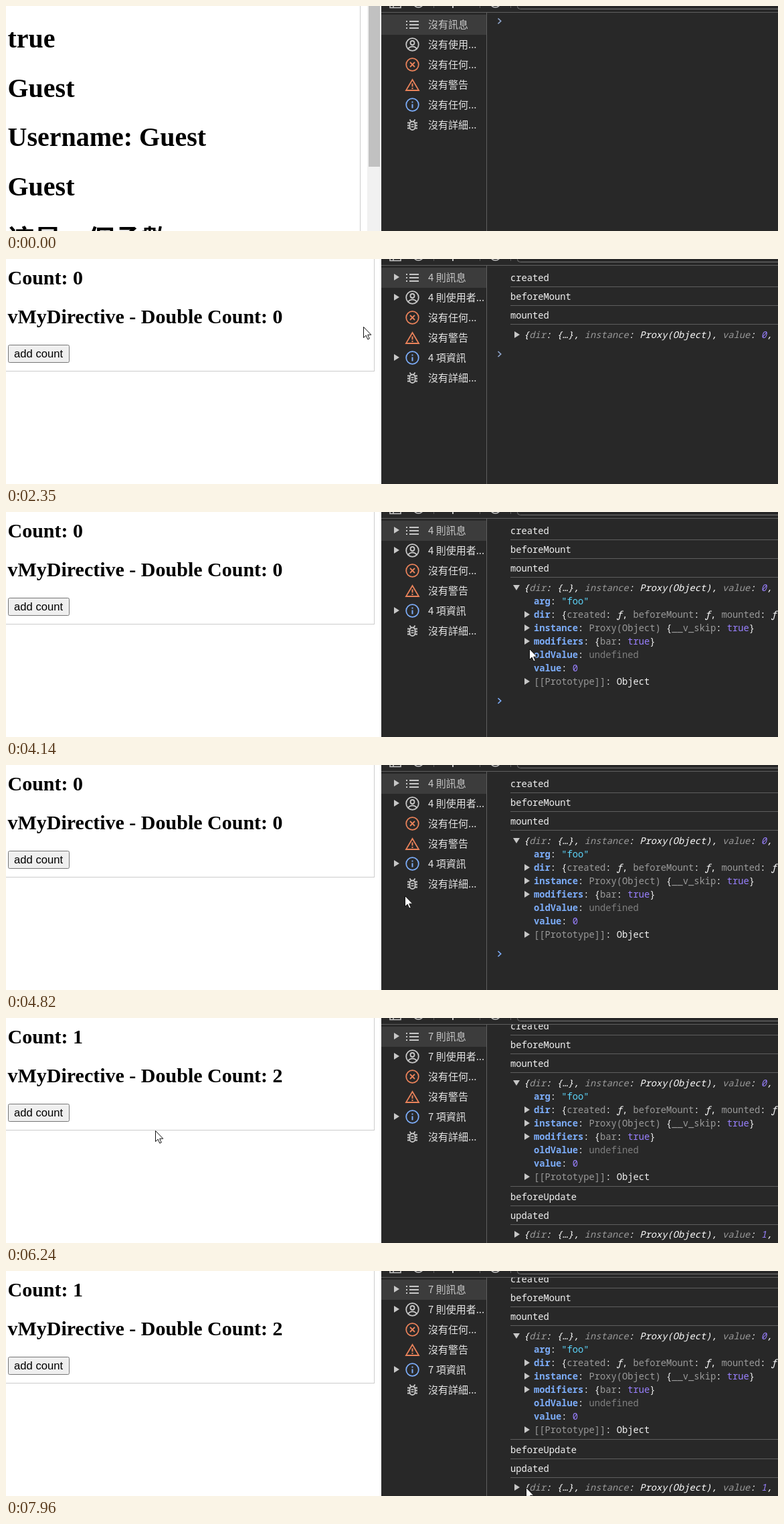
An HTML page with a canvas that plays this animation: 1154 by 336 pixels, repeating every 8 s.

```html
<!DOCTYPE html>
<html lang="zh-Hant">
<head>
<meta charset="utf-8">
<title>Directive hooks</title>
<style>
html, body { margin: 0; width: 100%; height: 100%; overflow: hidden; background: #fff; }
canvas { display: block; }
</style>
</head>
<body>
<canvas id="stage" width="1154" height="336"></canvas>
<script>
const canvas = document.getElementById('stage');
const ctx = canvas.getContext('2d');
const { width: W, height: H } = canvas;
const LOOP = 8000;
const SPLIT = 561, SIDE = 718, BAR = 10;
const LOG_X = 754, LOG_ROW = 28, TREE_ROW = 20, SIDE_ROW = 30;
const SERIF = '"Liberation Serif", serif';
const SANS = '"Liberation Sans", sans-serif';
const MONO = '"Noto Sans Mono", "DejaVu Sans Mono", monospace';
const CJK = '"Noto Sans CJK TC", "Noto Sans CJK", sans-serif';
const CODE_SIZE = 13.75, CELL = CODE_SIZE * 0.6;
const PANEL = '#282828', GREY = '#c7c7c7', LINE = '#5e5e5e';
const BLUE = '#7cacf8', DIM_BLUE = '#8fa5cc', ORANGE = '#e9825a';

// When the page and the console change.
const AT = { page: 1280, mount: 1350, expand: 3330, press: 5710, update: 5770 };

const linear = u => u;
const smooth = u => u * u * (3 - 2 * u);
const easeOut = power => u => 1 - (1 - u) ** power;

// Each cursor move starts where the last one ended, unless it has its own start.
const MOVES = [
  { start: 200, end: 550, steps: 6, from: [1142, -26], to: [344, 346], ease: linear },
  { start: 2140, end: 2760, steps: 9, from: [342, 198], to: [764, 115], ease: easeOut(1.5), bow: [0, -60] },
  { start: 3670, end: 4410, steps: 12, to: [819, 239], ease: linear, bow: [-22, 7] },
  { start: 4480, end: 5220, steps: 11, to: [303, 138], ease: smooth },
  { start: 5290, end: 5570, steps: 5, to: [68, 145], ease: easeOut(3) },
  { start: 6240, end: 6670, steps: 7, to: [819, 231], ease: easeOut(1.5), bow: [0, 8] },
  { start: 7060, end: 7830, steps: 12, to: [742, 315], ease: linear, bow: [62, -80] },
  { start: 7960, end: 7960, steps: 1, to: [777, 323], ease: linear }
];
MOVES.forEach((move, i) => move.from ??= MOVES[i - 1].to);

// Segments are split by "|"; the first letter picks the style.
const STYLES = {
  w: ['#f2f2f2', ''], g: ['#9a9a9a', ''], k: [BLUE, 'bold'], s: ['#5cd5fb', ''],
  n: ['#9980ff', ''], u: ['#7f7f7f', ''], i: ['#fff', 'italic'],
  d: ['#9a9a9a', 'italic'], m: ['#9980ff', 'italic']
};
const preview = value =>
  `i{|ddir|i: {…}, |dinstance|i: Proxy(Object), |dvalue|i: |m${value}|i,`;
const DETAILS = [
  'karg|w: |s"foo"',
  '>kdir|w: {|gcreated|w: |iƒ|w, |gbeforeMount|w: |iƒ|w, |gmounted|w: |iƒ|w,',
  '>kinstance|w: |gProxy(Object) |w{|g__v_skip|w: |ntrue|w}',
  '>kmodifiers|w: {|gbar|w: |ntrue|w}',
  'koldValue|w: |uundefined',
  'kvalue|w: |n0',
  '>g[[Prototype]]|w: Object'
];

function text(str, x, y, font, color) {
  ctx.font = font;
  ctx.fillStyle = color;
  ctx.fillText(str, x, y);
}

function rect(x, y, w, h, color) {
  ctx.fillStyle = color;
  ctx.fillRect(x, y, w, h);
}

function stroke(color, width, draw) {
  ctx.strokeStyle = color;
  ctx.lineWidth = width;
  ctx.beginPath();
  draw();
  ctx.stroke();
}

function poly(points, close) {
  points.forEach(([x, y], i) => i ? ctx.lineTo(x, y) : ctx.moveTo(x, y));
  if (close) ctx.closePath();
}

function segment(x1, y1, x2, y2) {
  poly([[x1, y1], [x2, y2]]);
}

function circle(x, y, r) {
  ctx.moveTo(x + r, y);
  ctx.arc(x, y, r, 0, Math.PI * 2);
}

function expander(x, y, open) {
  ctx.save();
  ctx.translate(x, y);
  if (open) ctx.rotate(Math.PI / 2);
  ctx.fillStyle = GREY;
  ctx.beginPath();
  poly([[-4, -5], [4, 0], [-4, 5]], true);
  ctx.fill();
  ctx.restore();
}

function cursorAt(t) {
  const move = MOVES.findLast(m => t >= m.start);
  if (!move) return MOVES[0].from;
  const { start, end, steps, from, to, ease, bow = [0, 0] } = move;
  const gap = (end - start) / (steps - 1) || 1;
  const step = Math.min(steps, Math.floor((t - start + 1) / gap) + 1);
  const u = ease(step / steps);
  const swing = Math.sin(Math.PI * u);
  return from.map((v, axis) => Math.round(v + (to[axis] - v) * u + bow[axis] * swing));
}

function drawCursor([x, y]) {
  ctx.save();
  ctx.translate(x + 0.5, y + 0.5);
  ctx.fillStyle = '#fff';
  stroke('#111', 1, () => {
    poly([[0, 0], [0, 16], [3.7, 12.6], [6.3, 18.5], [8.8, 17.4], [6.2, 11.7], [11.3, 11.7]], true);
    ctx.fill();
  });
  ctx.restore();
}

function drawIntro() {
  const font = `bold 40px ${SERIF}`;
  ['true', 'Guest', 'Username: Guest', 'Guest'].forEach((line, i) =>
    text(line, 2.5, Math.round(62 + i * 73.6), font, '#000'));
  text('這是一個函數', 2.5, 363, `bold 40px ${CJK}`, '#000');
  rect(529, 0, 1, H, '#ccc');
  rect(540, 0, SPLIT - 540, H, '#f1f1f1');
  rect(542, 0, 17, 240, '#c1c1c1');
}

function drawButton(x, y, w, h, pressed, [cx, cy]) {
  const hover = cx > x && cx < x + w && cy > y && cy < y + h;
  const [fill, border] = pressed ? ['#f5f5f5', '#8d8d8d']
    : hover ? ['#e5e5e5', '#4f4f4f'] : ['#efefef', '#767676'];
  ctx.fillStyle = fill;
  stroke(border, 1, () => {
    ctx.roundRect(x + 0.5, y + 0.5, w - 1, h - 1, 2);
    ctx.fill();
  });
  text('add count', x + 9, y + 19, `16.67px ${SANS}`, '#000');
}

function drawCounter(t, cursor) {
  const count = t >= AT.update ? 1 : 0;
  const font = `bold 30px ${SERIF}`;
  text(`Count: ${count}`, 2.5, 38, font, '#000');
  text(`vMyDirective - Double Count: ${count * 2}`, 2.5, 96, font, '#000');
  rect(550, 0, 1, 168, '#ccc');
  rect(0, 167, 551, 1, '#ccc');
  drawButton(3, 128, 92, 27, t >= AT.press && t < AT.update, cursor);
}

// Sidebar icons, drawn around their own centre.
const ring = color => stroke(color, 1.8, () => circle(0, 0, 9.3));
const ICONS = [
  () => [-5, 0, 5].forEach(y => {
    rect(-9.5, y - 0.5, 2, 2, GREY);
    rect(-4.5, y - 0.5, 14, 2, GREY);
  }),
  () => {
    ring(GREY);
    stroke(GREY, 1.8, () => circle(0, -2.5, 3));
    stroke(GREY, 1.8, () => ctx.arc(0, 11, 8, Math.PI * 1.2, Math.PI * 1.8));
  },
  () => {
    ring(ORANGE);
    stroke(ORANGE, 1.8, () => [-1, 1].forEach(s => segment(-3.5, -3.5 * s, 3.5, 3.5 * s)));
  },
  () => {
    stroke(ORANGE, 1.8, () => poly([[0, -7.5], [9.5, 8.5], [-9.5, 8.5]], true));
    rect(-1, -2, 2, 5, ORANGE);
    rect(-1, 4.5, 2, 2, ORANGE);
  },
  () => {
    ring(BLUE);
    rect(-1, -5, 2, 2, BLUE);
    rect(-1, -1, 2, 6, BLUE);
  },
  () => {
    stroke(GREY, 1.8, () => {
      ctx.roundRect(-4, -5, 8, 12.5, 4);
      for (const side of [-1, 1]) {
        [-3, 1, 5].forEach(y => segment(side * 4, y, side * 7.5, y));
        segment(side * 4, -8, side * 2, -5);
      }
    });
    [-1.5, 2].forEach(y => rect(-2, y, 4, 1.7, GREY));
  }
];

function drawSidebar(total) {
  rect(SPLIT, 13, SIDE - SPLIT, SIDE_ROW, '#3c3c3c');
  const labels = ['沒有訊息', '沒有使用...', '沒有任何...', '沒有警告', '沒有任何...', '沒有詳細...'];
  if (total) {
    labels[0] = `${total} 則訊息`;
    labels[1] = `${total} 則使用者...`;
    labels[4] = `${total} 項資訊`;
  }
  labels.forEach((label, i) => {
    const y = 28 + i * SIDE_ROW;
    ctx.save();
    ctx.translate(607.5, y - 0.5);
    ICONS[i]();
    ctx.restore();
    if (/^\d/.test(label)) expander(584, y - 1);
    text(label, 631, y + 5, `15px ${CJK}`, i ? '#e3e3e3' : GREY);
  });
}

function drawToolbar() {
  rect(SPLIT, 0, W - SPLIT, BAR, PANEL);
  rect(SPLIT, BAR - 1, W - SPLIT, 1, LINE);
  rect(SIDE, BAR, 1, H - BAR, LINE);
  stroke(GREY, 1.6, () => {
    ctx.rect(574, -12, 16, 14.5);
    segment(579, -12, 579, 2.5);
  });
  [616.5, 731.5].forEach(x => stroke(GREY, 1.6, () => circle(x, -6, 8)));
  rect(667, 0, 2, 3, GREY);
  [639, 708, 754].forEach(x => rect(x, 0, 1, 3, LINE));
  stroke('#757575', 1, () => ctx.roundRect(764.5, -20, W - 734, 24.5, 4));
}

function codeLine(markup, x, y) {
  let column = 0;
  for (const part of markup.split('|')) {
    const [color, weight] = STYLES[part[0]];
    const body = part.slice(1);
    text(body, x + column * CELL, y + 5, `${weight} ${CODE_SIZE}px ${MONO}`, color);
    column += body.length;
  }
}

function rule(y) {
  rect(LOG_X, y, W - LOG_X, 1, LINE);
}

function logs(names, top) {
  names.forEach((name, i) => {
    const y = top + i * LOG_ROW;
    codeLine('w' + name, LOG_X, y);
    rule(y + 13);
  });
}

function objectLine(value, y, open) {
  expander(open ? 763 : 764, y, open);
  codeLine(preview(value), 774, y);
}

function prompt(y, color) {
  stroke(color, 1.7, () => poly([[735.5, y - 4], [739.7, y], [735.5, y + 4]]));
}

function drawConsole(t) {
  if (t < AT.mount) return prompt(22.5, DIM_BLUE);
  const open = t >= AT.expand, updated = t >= AT.update;
  ctx.save();
  ctx.beginPath();
  ctx.rect(SIDE + 1, BAR, W, H);
  ctx.clip();
  if (updated) ctx.translate(0, -16);

  logs(['created', 'beforeMount', 'mounted'], 28);
  objectLine(0, 113, open);
  if (open) {
    DETAILS.forEach((row, i) => {
      const y = 113 + (i + 1) * TREE_ROW;
      if (row[0] === '>') expander(779, y);
      codeLine(row.replace(/^>/, ''), 789, y);
    });
  }
  if (updated) {
    rule(267);
    logs(['beforeUpdate', 'updated'], 283);
    objectLine(1, 339);
  } else {
    prompt(open ? 282 : 142, open ? BLUE : DIM_BLUE);
  }
  ctx.restore();
}

function render(t) {
  const cursor = cursorAt(t);
  rect(0, 0, W, H, '#fff');
  if (t < AT.page) drawIntro();
  else drawCounter(t, cursor);
  rect(SPLIT, 0, W - SPLIT, H, PANEL);
  drawSidebar(t >= AT.update ? 7 : t >= AT.mount ? 4 : 0);
  drawConsole(t);
  drawToolbar();
  drawCursor(cursor);
}

function tick() {
  render(performance.now() % LOOP);
  requestAnimationFrame(tick);
}
tick();
</script>
</body>
</html>
```
